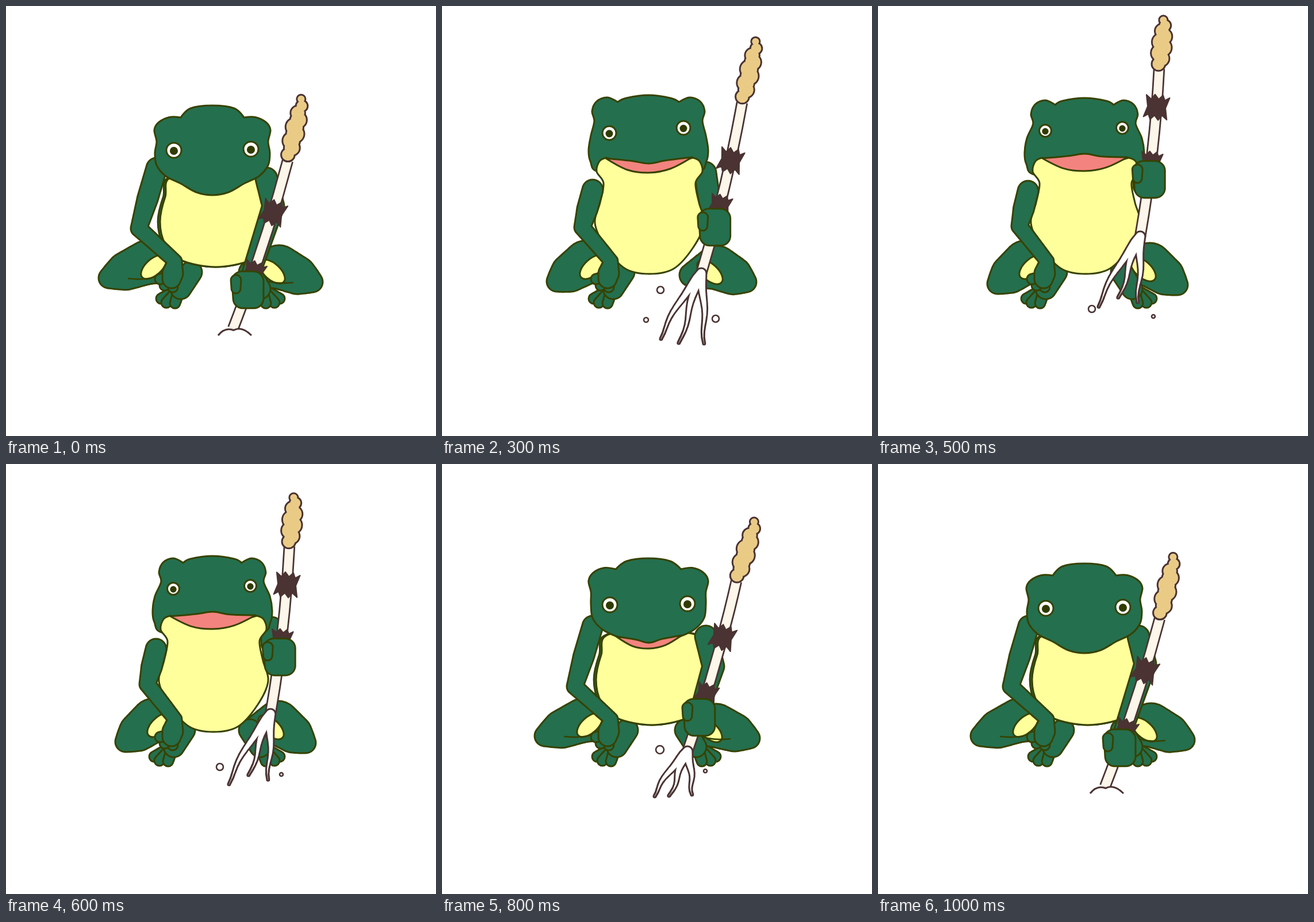
These frames come from a looping animation (748 by 748 pixels, 1100 ms). An HTML page:

```html
<!DOCTYPE html>
<html lang="en">
<head>
<meta charset="utf-8">
<title>Frog pulling up a staff</title>
<style>
  html, body { margin: 0; width: 100%; height: 100%; overflow: hidden; background: #fff; }
  svg { display: block; width: 100vw; height: 100vh; stroke-linejoin: round; }
</style>
</head>
<body>
<svg id="stage" viewBox="0 0 748 748"></svg>
<script>
const GREEN = '#246f4e', YELLOW = '#ffff9c', PINK = '#f3837e', INK = '#374200';
const BROWN = '#4a3332', CREAM = '#fdf6ea', TAN = '#eacb86';

// Joints are [x, y]; mouth is [y, half width, upper dip, lower dip];
// grips are places along the shaft for two collars and the hand.
const low = {
  top: 173, knob: 18, spread: 1, chin: 156,
  mouth: [305, 57, 24, 24], eyes: [[292, 251], [426, 249]], eyeSize: 13,
  knees: [[179, 473], [533, 480]], hips: [[245, 446], [475, 454]], foot: 322,
  shoulders: [[262, 282], [453, 300]], elbows: [[231, 387], [465, 348]],
  staff: { tip: [517, 155], neck: [490, 269], end: [395, 561] }, grips: [.31, .66, .77],
  rootTips: [], drops: []
};
const pull = {
  ...low, top: 164, knob: 14, spread: 1.03, chin: 147,
  mouth: [300, 57, 11, 21], eyes: [[292, 245], [427, 243]],
  knees: [[179, 473], [535, 477]], hips: [[245, 446], [477, 455]],
  shoulders: [[262, 282], [459, 300]], elbows: [[231, 387], [472, 352]],
  staff: { tip: [547, 94], neck: [512, 204], end: [427, 500] }, grips: [.33, .66, .8],
  rootTips: [[366, 578], [397, 577], [437, 575]],
  drops: [[379, 497, 7], [458, 534, 3]]
};
const lift = {
  open: true, top: 155, knob: 0, spread: .97, chin: 138,
  mouth: [265, 75, 9, 25], eyes: [[291, 221], [420, 212]], eyeSize: 12,
  knees: [[200, 479], [529, 480]], hips: [[250, 446], [478, 455]], foot: 316,
  shoulders: [[262, 320], [458, 290]], elbows: [[244, 385], [462, 318]],
  staff: { tip: [549, 55], neck: [522, 168], end: [451, 465] }, grips: [.34, .6, .73],
  rootTips: [[377, 579], [414, 586], [458, 587]],
  drops: [[380, 494, 6], [355, 546, 4], [476, 544, 6]]
};
const high = {
  ...lift, top: 160, spread: .92, mouth: [265, 74, -8, 22],
  eyes: [[291, 217], [425, 212]], eyeSize: 10.5,
  knees: [[208, 483], [521, 485]], hips: [[256, 446], [473, 450]], foot: 310,
  shoulders: [[261, 322], [462, 285]], elbows: [[246, 383], [463, 312]],
  staff: { tip: [503, 53], neck: [493, 143], end: [460, 435] }, grips: [.23, .555, .66],
  rootTips: [[384, 557], [424, 541], [458, 549]],
  drops: [[372, 527, 6], [479, 540, 3]]
};

const mix = (a, b, t) => a + (b - a) * t;
const lerp = (p, q, t) => [mix(p[0], q[0], t), mix(p[1], q[1], t)];
const shift = ([x, y], dx, dy) => [x + dx, y + dy];
const ring = ([x, y], r) => [x, y, r];

function blend(a, b, t) {
  if (typeof a === 'number') return mix(a, b, t);
  if (Array.isArray(a)) return a.map((v, i) => blend(v, b[i], t));
  return Object.fromEntries(Object.keys(a).map(k => [k, blend(a[k], b[k], t)]));
}

const raise = ({ tip, neck, end }) =>
  ({ tip: shift(tip, -4, -34), neck: shift(neck, -4, -34), end: shift(end, -4, -34) });

const loosen = blend(low, pull, .5);
loosen.rootTips = pull.rootTips.map(p => shift(p, -14, 0));
const peak = {
  ...high, staff: raise(high.staff), rootTips: high.rootTips.map(p => shift(p, -4, -34))
};

// Smooth closed outline; a third value marks a sharp corner.
function curve(pts) {
  const at = i => pts[(i + pts.length) % pts.length];
  const handle = (i, dir) => {
    const [x, y, sharp] = at(i), k = sharp ? 0 : dir / 6;
    return `${x + (at(i + 1)[0] - at(i - 1)[0]) * k},${y + (at(i + 1)[1] - at(i - 1)[1]) * k}`;
  };
  return `M${at(0)[0]},${at(0)[1]}` + pts.map((p, i) =>
    `C${handle(i, 1)} ${handle(i + 1, -1)} ${at(i + 1)[0]},${at(i + 1)[1]}`).join('') + 'Z';
}

const mirror = (half, cx) => [
  ...half.map(([dx, y, sharp]) => [cx + dx, y, sharp]),
  ...half.filter(p => p[0]).reverse().map(([dx, y, sharp]) => [cx - dx, y, sharp])
];

const path = (d, fill, ink = INK, width = 3) =>
  `<path d="${d}" fill="${fill}" stroke="${ink}" stroke-width="${width}"/>`;
const shape = (pts, fill) => path(curve(pts), fill);

const circle = ([x, y, r]) => `M${x - r},${y}a${r},${r} 0 1 0 ${2 * r},0a${r},${r} 0 1 0 ${-2 * r},0`;
const discs = (list, grow, fill) =>
  `<path fill="${fill}" d="${list.map(([x, y, r]) => circle([x, y, Math.max(.2, r + grow)])).join('')}"/>`;
const merged = (list, fill, ink = INK) => discs(list, 1.5, ink) + discs(list, -1.5, fill);

// Fills the gaps between key circles so that they read as one tapering limb.
function chain(keys) {
  return keys.slice(1).flatMap((b, i) => {
    const a = keys[i], n = Math.ceil(Math.hypot(b[0] - a[0], b[1] - a[1]) / 2) || 1;
    return Array.from({ length: n + 1 }, (_, k) => blend(a, b, k / n));
  });
}
const limb = (keys, fill = GREEN) => merged(chain(keys), fill);

function leg(knee, hip, side, crease) {
  const sizes = [[0, 18], [.2, 25], [.45, 33], [1, 38]];
  const [px, py] = shift(hip, side * 12, 8), [kx, ky] = knee;
  return limb([...sizes.map(([t, r]) => ring(lerp(knee, hip, t), r)), ring(shift(hip, side * 45, 13), 20)]) +
    `<ellipse rx="27" ry="14" transform="translate(${px} ${py}) rotate(${-42 * side})"
      fill="${YELLOW}" stroke="${INK}" stroke-width="3"/>` +
    (crease ? path(`M${kx + side * 33},${ky + 1}q${side * 32},4 ${side * 56},-6`, 'none', INK, 2.6) : '');
}

function foot(x, side) {
  const toes = [[-52, 46], [-43, 53], [-28, 54]];
  return toes.map(([dx, dy]) => limb([[x - side * 20, 492, 10], [x + side * dx, 463 + dy, 9]])).join('') +
    limb([[x, 463, 19], [x - side * 18, 492, 18]]);
}

function restingArm(shoulder, elbow) {
  const hand = [290, 469], wrist = shift(hand, 4, -25);
  const fingers = [[0, 20], [-14, 17], [-22, 6]];
  return fingers.map(([dx, dy]) => limb([ring(hand, 9), ring(shift(hand, dx, dy), 9)])).join('') +
    limb([ring(shoulder, 18), ring(lerp(shoulder, elbow, .5), 18), ring(elbow, 14),
      ring(lerp(elbow, wrist, .5), 13), ring(wrist, 12), ring(shift(hand, 0, -4), 18), ring(shift(hand, -2, 6), 16)]);
}

function head({ top, knob, spread, chin, open }) {
  const crown = [[0, 0], [38, 5], [55 * spread, 12 + knob / 2, 1], [74 * spread, 4 + knob * .9],
    [93 * spread, 11 + knob], [101 * spread, 28 + knob * .8], [97 * spread, 45 + knob], [100, 70 + knob * .7]];
  const jaw = open ? [[104, 95], [101, 115], [85, 134]] : [[97, 104], [81, 123], [55, 136], [28, chin - 5]];
  const half = [...crown, ...jaw, [0, chin]].map(([dx, dy, sharp]) => [dx, top + dy, sharp]);
  return shape(mirror(half, 359), GREEN);
}

function belly(open) {
  const half = open
    ? [[0, 466], [42, 457], [76, 420], [95, 378], [86, 342], [80, 308], [92, 288], [87, 270], [75, 264, 1], [0, 280]]
    : [[0, 454], [60, 442], [88, 414], [97, 375], [88, 332], [70, 295]];
  const wider = half.map(([dx, y]) => [dx * 1.04, y]);
  return (open ? '' : shape(mirror(wider, 365), GREEN)) + shape(mirror(half, open ? 361 : 365), YELLOW);
}

function mouth([y, w, upper, lower]) {
  if (upper === lower) return '';
  const left = [[-w, 0, 1], [-w * .4, upper * .5], [0, upper], [w * .4, upper * .4], [w, -2, 1],
    [w * .5, lower * .72], [0, lower], [-w * .5, lower * .8]];
  return shape(left.map(([dx, dy, sharp]) => [360 + dx, y + dy, sharp]), PINK);
}

const eye = ([x, y], r) =>
  path(circle([x, y, r]), '#fff') + discs([[x, y + 1, r * .54]], 0, '#303b00');

// A ragged leaf collar: spiked at both ends, narrower in the middle.
function collar([x, y], w, h, angle) {
  const edge = [[-1, -.9], [-.55, -.6], [-.25, -1], [.1, -.65], [.45, -1], [.65, -.6], [1.05, -.85], [.78, 0]];
  const outline = [...edge, ...edge.map(([u, v]) => [-u, -v])];
  const d = 'M' + outline.map(([u, v]) => `${u * w},${v * h}`).join('L') + 'Z';
  return `<g transform="translate(${x} ${y}) rotate(${angle})">${path(d, BROWN, BROWN, 2)}</g>`;
}

function seedHead(neck, tip) {
  const beads = Array.from({ length: 9 }, (_, i) => {
    const s = i / 8, sway = i % 2 ? 2 : -2;
    return ring(shift(lerp(neck, tip, .09 + .85 * s), sway, 0), 6 + 10 * Math.sin(Math.PI * (.2 + .75 * s)));
  });
  return merged(beads, TAN, BROWN);
}

function roots(end, tips) {
  const strands = tips.flatMap((tip, n) => chain(Array.from({ length: 13 }, (_, i) => {
    const t = i / 12, wave = 4 * t * Math.sin(t * 8 + n * 2);
    return [mix(end[0], tip[0], t ** .85) + wave, mix(end[1], tip[1], t), 2 + 7 * (1 - t) ** 1.3];
  })));
  const mound = `M${end[0] - 26},${end[1] + 12}q12,-15 27,-9q14,-8 31,9`;
  return tips.length ? merged(strands, '#fff', BROWN) : path(mound, '#fff', BROWN);
}

function staff({ tip, neck, end }, grips, tips) {
  const bend = shift(lerp(neck, end, .5), 9, 0);
  const along = t => lerp(lerp(neck, bend, t), lerp(bend, end, t), t);
  const d = `M${neck}Q${bend} ${end}`;
  const angle = Math.atan2(neck[0] - end[0], end[1] - neck[1]) * 180 / Math.PI;
  const [upper, lower, hold] = grips.map(along);
  const palm = [[-10, -15], [11, -15], [11, 15], [-8, 15], [-10, -15]];
  return path(d, 'none', BROWN, 20.5) + path(d, 'none', CREAM, 15) + seedHead(neck, tip) + roots(end, tips) +
    collar(upper, 20, 22, angle) + collar(lower, 18, 18, angle) +
    limb(palm.map(([dx, dy]) => ring(shift(hold, dx, dy), 17))) +
    limb([ring(shift(hold, -20, -17), 9), ring(shift(hold, -20, -2), 8)]);
}

function gripArm(pose) {
  const { neck, end } = pose.staff;
  const hand = lerp(neck, end, pose.grips[2]);
  const [shoulder, elbow] = [pose.shoulders[1], pose.elbows[1]];
  return limb([ring(shoulder, 19), ring(elbow, 19), ring(hand, 15)]);
}

function render(pose) {
  const { open, knees, hips } = pose;
  const rest = restingArm(pose.shoulders[0], pose.elbows[0]), grip = gripArm(pose);
  const lips = mouth(pose.mouth), face = head(pose), torso = belly(open);
  const upperBody = open ? grip + face + torso + lips + rest : torso + rest + grip + face + lips;
  return leg(knees[0], hips[0], 1, !open) + leg(knees[1], hips[1], -1, !open) +
    foot(pose.foot, 1) + (pose === lift ? '' : foot(424, -1)) + upperBody +
    pose.eyes.map(p => eye(p, pose.eyeSize)).join('') +
    staff(pose.staff, pose.grips, pose.rootTips) +
    pose.drops.map(p => path(circle(p), '#fff', BROWN, 2.6)).join('');
}

const rising = [low, loosen, pull, lift, high].map(render);
const steps = [...rising, render(peak), ...rising.slice().reverse()];
const stage = document.getElementById('stage');
let shown = -1;

function update(now) {
  const step = Math.floor(now % 1100 / 100);
  if (step !== shown) stage.innerHTML = steps[shown = step];
}

const start = performance.now();
function tick() {
  update(performance.now() - start);
  requestAnimationFrame(tick);
}
tick();
</script>
</body>
</html>
```
